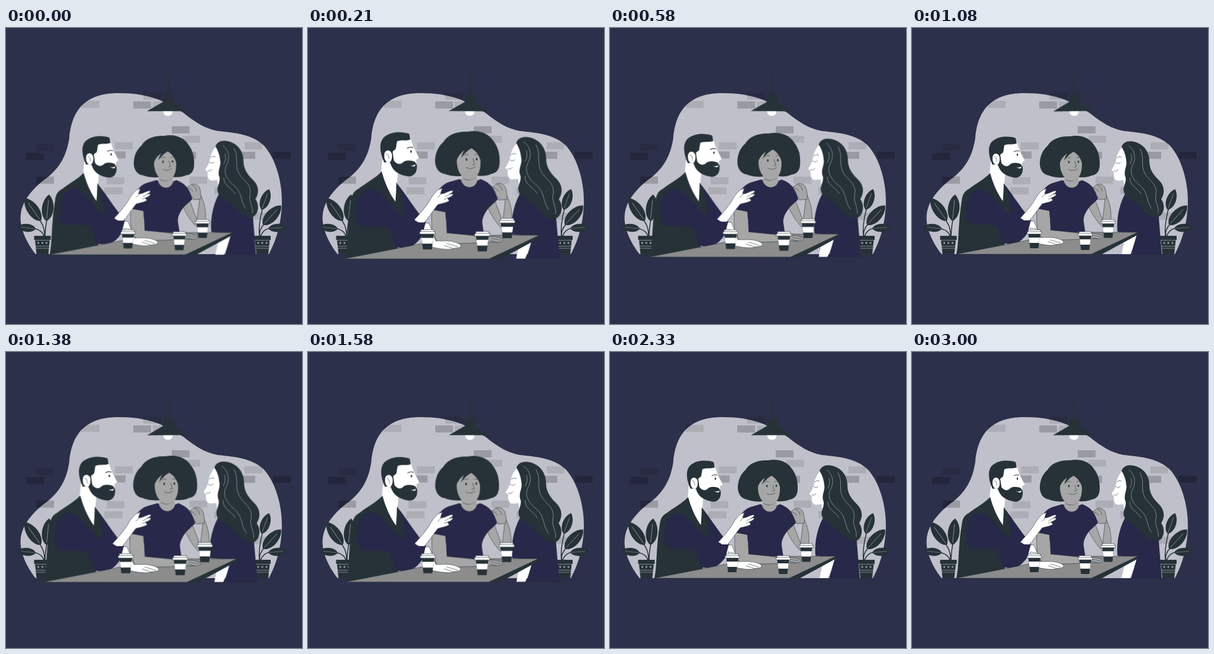
An HTML page that plays this animation: 500x500 px, repeating every 3.04 s.

```html
<!DOCTYPE html>
<html lang="en">
<head>
<meta charset="utf-8">
<title>Coffee with friends</title>
<style>
  html, body { margin: 0; width: 100%; height: 100%; overflow: hidden; background: #2c304a; }
  svg { display: block; width: 100%; height: 100%; }

  .dark { fill: #263238; }
  .navy { fill: #28284b; }
  .white { fill: #fff; }
  .skin { fill: #a6a6a6; }
  .ink { stroke: #263238; stroke-width: .6; stroke-linejoin: round; stroke-linecap: round; }
  .line { fill: none; stroke: #263238; stroke-width: 1; stroke-linecap: round; stroke-linejoin: round; }
  .thin { stroke-width: .6; }
  .pale { fill: none; stroke: #a9adb2; stroke-width: .7; stroke-linecap: round; }
  .stem { fill: none; stroke: #263238; stroke-width: 1.5; }

  .beat { animation: beat 3.04s linear -25ms infinite; }
  .man { transform-origin: 228px 281.5px; }
  .woman { transform-origin: 232px 281.5px; }
  .girl { transform-origin: 385px 286px; }
  .table { transform-origin: 262px 281.5px; }
  .cups { transform-origin: 268px 347px; }
  .lamp { transform-origin: 272px 113px; animation: sway 1.52s linear infinite; }

  /* two pulses: slow release, then quick release, then rest */
  @keyframes beat {
    0%, 29.605%, 39.474%, 59.21%, 100% { transform: scale(1); }
    9.868%, 49.342% { transform: scale(1.1); }
  }
  @keyframes sway {
    0%, 100% { transform: rotate(0deg); }
    25% { transform: rotate(1deg); }
    75% { transform: rotate(-1deg); }
  }
</style>
</head>
<body>
<svg viewBox="0 0 500 500">
  <defs>
    <g id="cup">
      <path class="dark" d="M-10 7H10L7 31H-7Z"/>
      <path class="white" d="M-9.2 13H9.2L8 22H-8Z"/>
      <path class="white ink" d="M-10 0H10L10.6 3H12V7H-12V3H-10.6Z"/>
      <path class="line thin" d="M-10.6 3H10.6"/>
    </g>
    <g id="pot">
      <path class="dark" d="M-14 0H14V7H12.5L10 31H-10L-12.5 7H-14Z"/>
      <path class="pale" d="M-12.5 7.500H12.5M-11.500 17.500H11.500M-11 21H11"/>
      <g fill="#8d9297"><circle cx="-7" cy="12" r="1.700"/><circle cy="12" r="1.700"/><circle cx="7" cy="12" r="1.700"/></g>
    </g>
    <g id="leaf">
      <path class="dark" d="M0 22C-13 15-13-12 0-23C13-12 13 15 0 22Z"/>
      <path class="pale" d="M0 18V-13"/>
    </g>
  </defs>

  <rect width="500" height="500" fill="#2c304a"/>
  <path fill="#c0c0ca" d="M50 382C34 362 22 335 25 314C28 290 47 270 65 256C92 237 103 213 107 185C111 143 130 110 190 110C241 110 268 123 300 143.500C321 160 336 170 358 174C388 177 415 180 434 197C456 219 467 262 466 296C465 333 455 362 444 382Z"/>

  <g fill="#000" fill-opacity=".1">
    <path d="M128 123h30v12h-30zM184 193h30v12h-30zM298 182h30v12h-30zM403 193h30v12h-30zM170 252h30v12h-30zM310 251h30v12h-30zM166 269h31v12h-31zM352 269h30v12h-30zM410 312h30v12h-30zM51 196h30v12h-30zM232 109h30v12h-30zM248 124h30v12h-30z"/>
    <path fill-opacity=".2" d="M215 124h30v12h-30zM280 166h30v12h-30zM172 208.500h30v12h-30zM291 209h30v12h-30zM391 209h30v12h-30zM34 211h30v12h-30zM451 209h30v12h-30zM51 251h30v12h-30z"/>
  </g>

  <g class="lamp">
    <circle class="white" cx="273.500" cy="140.500" r="8"/>
    <path class="dark" d="M272.500 78H275.500V112H283V125L306 140.500H238L265 125V112H272.500Z"/>
  </g>

  <g>
    <path class="stem" d="M58 326Q66 338 65 352M69 324Q66 340 66 352M49 339Q62 342 64 352"/>
    <use href="#leaf" transform="translate(45.500 307) rotate(-35) scale(1 1.050)"/>
    <use href="#leaf" transform="translate(70.500 304) rotate(6)"/>
    <use href="#leaf" transform="translate(35 337.500) rotate(-84) scale(.7)"/>
    <use href="#pot" transform="translate(61.500 351)"/>
    <path class="stem" d="M433 306Q426 334 428 352M437 330Q426 342 429 352M446 338Q434 340 430 352"/>
    <use href="#leaf" transform="translate(438 290) rotate(20) scale(.82)"/>
    <use href="#leaf" transform="translate(449 316.500) rotate(43)"/>
    <use href="#leaf" transform="translate(458.500 337.500) rotate(86) scale(.7)"/>
    <use href="#pot" transform="translate(433 351)"/>
  </g>

  <g class="beat woman">
    <path class="dark" d="M267 183C285 179.500 300 186 307 197C315 207 317.500 219 317 231C317 242 312 248 304 249C292 255 276 251 267 250C253 255 238 252 231 249C221 248 215 238 216 226C217 215 221 206 229 199C235 188 250 182 267 183Z"/>
    <path class="skin ink" d="M297 298L308 287L322 324L326 290L317 283L328 282C334 295 337 308 336 322C336 334 326 340 320 334C311 325 303 313 297 298Z"/>
    <path class="skin ink" d="M298 272C302 269 306 270 309 267C313 262 321 263 325 268C328 274 329 282 328 289L316 290C313 283 307 277 298 272Z"/>
    <path class="line thin" d="M306 270Q312 271 315 276M313 265Q320 268 321 275"/>
    <path class="skin ink" d="M211 302L233 303L234 337C258 340 281 343 300 347L299 357C270 358 240 359 222 356C210 352 210 330 211 302Z"/>
    <path class="navy" d="M254 257C264 262 278 262 287 257C301 262 309 270 314 289L300 302C293 311 289 319 290 327L293 347L234 343L232 309L211 305C213 286 221 268 237 262Z"/>
    <path class="line thin" d="M232 309L235 288M300 302L298 286"/>
    <path class="skin" d="M258 248H281L282 260C278 273 262 273 257 260Z"/>
    <path class="line thin" d="M260 256Q268 262 279 255"/>
    <path class="skin" d="M250 225C251 212 260 205 270 207C282 209 288 217 287 232C287 248 280 258 270 258C257 257 249 243 250 225Z"/>
    <path class="dark" d="M249 230C250 211 258 203 270 204C283 204 289 213 288 232C286 221 281 214 273 209C267 212 261 218 257 224C258 219 260 215 262 212C255 217 251 223 249 230Z"/>
    <ellipse class="dark" cx="265" cy="226.500" rx="1.300" ry="2"/>
    <ellipse class="dark" cx="281" cy="226" rx="1.300" ry="2"/>
    <path class="line thin" d="M261 220Q264 217 268 219M278 219Q282 217 285 220M275 225L278 234L274 235M265 239Q271 243 279 238"/>
  </g>

  <g class="beat girl">
    <path class="white" d="M362 344L384 340L378 360L368 382H354Z"/>
    <path class="navy" d="M364 273C383 272 407 283 416 309L422 382H370L380 348L347 344C345 319 351 293 364 273Z"/>
    <path class="line thin" d="M370 382H428M386 305C391 318 385 334 387 346M348 344C360 349 374 347 382 345"/>
    <path class="white" d="M356 199C349 208 346 215 345 221C344 229 341 233 337 240L341 243.500C340 252 342 257 348 258L357 257L360 276L382 278L382 210Z"/>
    <path class="dark" d="M354 201C357 191 369 189 381 194C394 199 401 212 401 225C401 238 407 247 416 256C429 268 426 281 421 289C429 300 425 316 416 319C405 322 394 312 388 304C380 293 367 291 360 281C353 270 362 265 361 253C356 242 364 234 362 225C361 214 358 207 354 201Z"/>
    <path class="pale" d="M366 199C376 206 379 219 373 231C366 244 373 256 385 266C400 279 395 292 405 305M385 204C394 218 385 232 394 247C402 259 415 265 412 281C409 293 418 302 416 312M368 253C367 266 380 269 387 280M370 213Q373 222 368 230"/>
    <path class="line thin" d="M344 227Q348 231 352 227M346 219Q350 216 354 218M341 241Q345 244 348 239"/>
  </g>

  <g class="beat man">
    <path class="white ink" d="M191 326L206 326L217 353L202 361Z"/>
    <path class="navy" d="M154 262C165 273 179 298 201 324L195 347L163 334L151 292Z"/>
    <path class="white" d="M133 226L158 240L156 264L153 298L130 258Z"/>
    <path class="dark" d="M132 245C122 256 107 263 96 272C88 276 85 282 84 292C81 308 80 325 79 340C78 355 78 367 75 382H153L164 333L167 303C166 287 162 274 155 262L154 293C146 282 138 267 132 245Z"/>
    <path class="navy" d="M121 273C107 268 95 280 92 300C89 324 95 330 105 332C119 332 133 331 143 334L154 363C166 367 180 364 187 356L200 325L187 317L179 325L157 309C145 296 134 280 121 273Z"/>
    <path class="line thin" d="M143 334L171 324"/>
    <path class="white ink" d="M183 321C192 311 201 301 207 291C211 283 216 278 220 274L227 271L224 280C230 281 235 276 242 275C245 275 244 278 238 281L243 280C245 282 241 285 235 287L238 291C234 294 227 295 220 297C212 307 204 319 196 329Z"/>
    <path class="line thin" d="M225 280L220 286M238 281L231 285M235 287L230 289"/>
    <path class="white" d="M147 194L177 191C179 201 182 208 185 213L190.500 224L186 227L186 240L160 246L145 228Z"/>
    <path class="dark" d="M136 231C127 212 128 195 139 189C148 183 163 182 175 186L177 195C169 198 162 195 156 198L154 210L149 214L151 228C155 234 161 235 165 231C169 227 177 227 184 230L187 235C188 245 184 252 175 253C159 251 148 244 145 230Z"/>
    <path class="white" d="M136 220C136 210 146 210 148 218C149 226 146 232 142 231C138 230 136 226 136 220Z"/>
    <path class="white" d="M176 235Q180 237 185 234L184 237Q180 238 176 235Z"/>
    <ellipse class="dark" cx="178" cy="214" rx="1.200" ry="2"/>
    <path class="line" d="M172 209Q176 206 181 208"/>
    <path class="line thin" d="M139 218Q143 216 143 225"/>
  </g>

  <g class="beat table">
    <path class="ink" fill="#8c8c8c" d="M75 382L155 366.500L262 345H382L303 382Z"/>
    <path class="dark" d="M303 382L382 344.500V349L321 382Z"/>
  </g>

  <g class="beat woman">
    <path class="skin ink" d="M222 340C245 343 271 344 289 348C302 346 314 347 322 351C324 354 320 356 315 356H300C270 358 239 359 221 356C214 351 214 343 222 340Z"/>
    <path class="line thin" d="M304 350L319 353M302 353L313 356"/>
    <path class="skin" d="M211.500 320L233 320L234 343L219 350Q211 341 211.500 320Z"/>
  </g>

  <g class="beat man">
    <path class="white ink" d="M200 338L209 339L217 354C228 354 239 353 247 356C254 358 258 361 255 363C253 366 249 364 245 366C237 368 228 367 217 365L203 362Z"/>
    <path class="line thin" d="M234 358L251 363M230 361L245 366"/>
    <path class="navy" d="M179 325L200 325L195 346C189 358 175 366 156 362L150 338Z"/>
  </g>

  <g class="beat cups">
    <use href="#cup" x="206.500" y="341"/>
    <use href="#cup" x="292.500" y="344"/>
    <use href="#cup" x="331.500" y="323.500"/>
  </g>
</svg>
</body>
</html>
```
